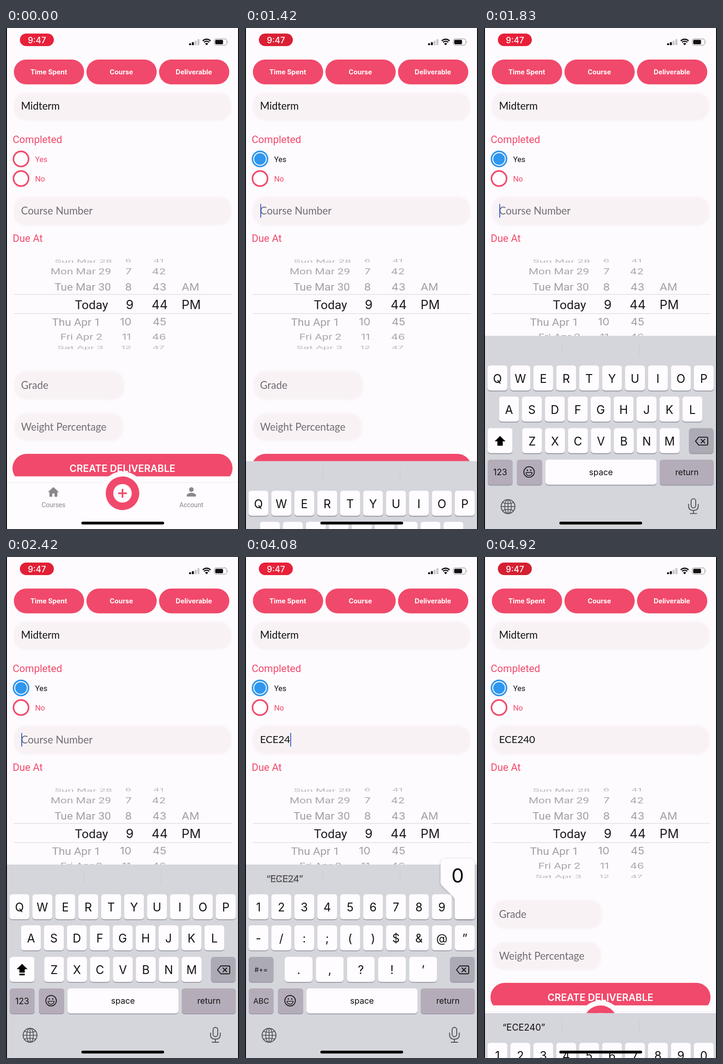
An HTML page for the animation above (5.01 s loop, 504 by 1080 pixels).

```html
<!DOCTYPE html>
<html lang="en">
<head>
<meta charset="utf-8">
<title>Deliverable form</title>
<style>
  html, body { margin: 0; width: 100%; height: 100%; overflow: hidden; background: #fefbfe; }
  svg { display: block; width: 504px; height: 1080px; }
  text { white-space: pre; }
</style>
</head>
<body>
<svg id="stage" viewBox="0 0 504 1080" xmlns="http://www.w3.org/2000/svg">
  <defs>
    <filter id="soft" x="-5%" y="-20%" width="110%" height="140%"><feGaussianBlur stdDeviation="2"/></filter>
    <filter id="lift" x="-30%" y="-30%" width="160%" height="160%">
      <feDropShadow dx="0" dy="1" stdDeviation="2" flood-opacity=".25"/>
    </filter>
  </defs>
</svg>
<script>
const LOOP = 5010, STEP = 1000 / 12;
const PINK = '#f1496b', GREY = '#8b878c', BLUE = '#2f97ee';
const UI = 'Inter, Roboto, sans-serif', TEXT = 'Roboto, Inter, sans-serif', FORM = 'Lato, sans-serif';
const stage = document.getElementById('stage');

function add(parent, tag, attrs = {}) {
  const node = document.createElementNS('http://www.w3.org/2000/svg', tag);
  for (const k in attrs) node.setAttribute(k, attrs[k]);
  return parent.appendChild(node);
}
const group = (parent, attrs) => add(parent, 'g', attrs);
const box = (p, x, y, w, h, r, fill, more) =>
  add(p, 'rect', { x, y, width: w, height: h, rx: r, fill, ...more });
const disc = (p, cx, cy, r, fill, more) => add(p, 'circle', { cx, cy, r, fill, ...more });
const line = (p, d, stroke, width, more) =>
  add(p, 'path', { d, fill: 'none', stroke, 'stroke-width': width, 'stroke-linecap': 'round', 'stroke-linejoin': 'round', ...more });
const shape = (p, d, fill, more) => add(p, 'path', { d, fill, ...more });
const show = (node, on) => node.setAttribute('visibility', on ? 'visible' : 'hidden');

// cy is the middle of the capital letters
function label(p, s, x, cy, size, font, fill, more) {
  const t = add(p, 'text', { x, y: cy + size * .36, 'font-size': size, 'font-family': font, fill, ...more });
  t.textContent = s;
  return t;
}
const centred = (p, s, x, cy, size, font, fill, more) =>
  label(p, s, x, cy, size, font, fill, { 'text-anchor': 'middle', ...more });

// Page
box(stage, 0, 0, 504, 1080, 0, '#fefbfe');
const page = group(stage);

const pill = box(page, 30, 12, 73.5, 27, 13.5, '#e8203a');
centred(page, '9:47', 67, 26, 18.2, UI, '#fff', { 'font-weight': 500 });

[[396, 4], [402, 6.5], [408, 9.5], [414, 13]].forEach(([x, h], i) =>
  box(page, x, 37 - h, 4.4, h, 1, i < 2 ? '#111' : '#c9c6c9'));
shape(page, 'M434 37.3 L430.6 33.7 Q434 30.8 437.4 33.7 Z', '#111');
line(page, 'M428.3 30.8 Q434 26.2 439.7 30.8', '#111', 2.6, { 'stroke-linecap': 'butt' });
line(page, 'M425.5 27.6 Q434 20.6 442.5 27.6', '#111', 2.8, { 'stroke-linecap': 'butt' });
box(page, 450.5, 23.5, 27, 13.5, 4, 'none', { stroke: '#a9a6a9', 'stroke-width': 1.3 });
box(page, 452.5, 25.5, 17, 9.5, 2.2, '#111');
shape(page, 'M479.3 28 q2.4 2.3 0 4.6 z', '#a9a6a9');

['Time Spent', 'Course', 'Deliverable'].forEach((s, i) => {
  const x = 17 + i * 157;
  box(page, x, 68, 152, 53.5, 26.7, PINK);
  centred(page, s, x + 75.5, 95, 14.3, UI, '#fff', { 'font-weight': 700 });
});

const field = (x, y, w, h) => box(page, x, y, w, h, 27, '#f8f2f5', { filter: 'url(#soft)' });
field(16, 139, 472, 61);
field(16, 363, 472, 63);
field(18, 739, 238, 63);
field(18, 830, 236, 61);
label(page, 'Midterm', 32.5, 168.5, 22.1, FORM, '#111');
label(page, 'Grade', 32.5, 770, 22.2, FORM, '#716c72');
label(page, 'Weight Percentage', 32.5, 860.5, 22.2, FORM, '#716c72');
const hint = label(page, 'Course Number', 32.5, 393.5, 22.3, FORM, '#716c72');
const entry = label(page, '', 32.5, 393.5, 22, FORM, '#111');
const caret = box(page, 33, 379, 2, 30, 1, '#3b66cf');

label(page, 'Completed', 14.5, 240, 22, TEXT, PINK);
label(page, 'Due At', 14.5, 453, 22, TEXT, PINK);
const ring = (parent, y, colour) =>
  disc(parent, 32.5, y, 16.3, '#fffdff', { stroke: colour, 'stroke-width': 3.4 });
const yesOff = group(page), yesOn = group(page);
ring(yesOff, 282.3, PINK);
label(yesOff, 'Yes', 63, 283, 16.4, TEXT, PINK);
ring(yesOn, 282.3, BLUE);
disc(yesOn, 32.5, 282.3, 12.6, BLUE);
label(yesOn, 'Yes', 63, 283, 16.4, TEXT, '#111');
ring(page, 324.5, PINK);
label(page, 'No', 63, 325, 16.6, TEXT, PINK);

// Date wheel: centre y, vertical squash, colour, then [text, centre x] per column
const ROWS = [
  [502, .4, '#bab7bb', ['Sun Mar 28', 167.5], ['6', 264.5], ['41', 329.5]],
  [525, .72, '#aaa7ab', ['Mon Mar 29', 162], ['7', 265], ['42', 330.5]],
  [558, .92, '#a29fa3', ['Tue Mar 30', 166], ['8', 265], ['43', 332], ['AM', 399]],
  [596, 1, '#1c1b1d', ['Today', 185], ['9', 267.5], ['44', 332.5], ['PM', 400.5]],
  [633.5, .92, '#a29fa3', ['Thu Apr 1', 152], ['10', 259], ['45', 332]],
  [666, .72, '#aaa7ab', ['Fri Apr 2', 163], ['11', 260.5], ['46', 331]],
  [688.5, .4, '#bab7bb', ['Sat Apr 3', 161], ['12', 260], ['47', 330]]
];
for (const [y, squash, fill, ...cells] of ROWS) {
  const big = squash === 1;
  cells.forEach(([s, x], col) => {
    const g = group(page, { transform: `translate(${x} ${y}) scale(1 ${squash})` });
    if (col) centred(g, s, 0, 0, big ? 27 : squash < .5 ? 22 : 24, UI, fill);
    else centred(g, s, 0, 0, big ? 26.7 : 24.4, TEXT, fill);
  });
}
box(page, 17, 573.8, 472, 1.2, 0, '#dbd8db');
box(page, 17, 615, 472, 1.2, 0, '#dbd8db');

box(page, 14, 918, 476, 62, 31, PINK);
centred(page, 'CREATE DELIVERABLE', 251.8, 949.5, 21.1, UI, '#fff', { 'font-weight': 600 });

// Tab bar
box(page, 0, 966.5, 504, 114, 0, '#fefcfe');
box(page, 2, 979, 500, 1.2, 0, '#efecef');
disc(page, 252, 1003, 47, '#fefcfe');
disc(page, 252, 1003, 36.3, PINK);
disc(page, 252, 1003, 20, '#fffdff');
line(page, 'M242.5 1003 h19 M252 993.5 v19', PINK, 3.6, { 'stroke-linecap': 'butt' });
shape(page, 'M102.5 989.5 L114.5 1000.5 H111 V1010.5 H105 V1003.5 H100 V1010.5 H94 V1000.5 H90.5 Z', GREY);
disc(page, 401, 995, 5, GREY);
shape(page, 'M391 1010 V1007.5 C391 1004 397 1002 401 1002 S411 1004 411 1007.5 V1010 Z', GREY);
centred(page, 'Courses', 102.8, 1028.3, 14, TEXT, GREY);
centred(page, 'Account', 401, 1028.3, 14, TEXT, GREY);

// Keyboard
const TOP = 663, TRAVEL = 1080 - TOP, PITCH = 49.6;
const DARK = '#b4adb9', SLATE = '#acabb5', INK = '#111';
const keyboard = group(stage);
box(keyboard, 0, TOP, 504, 460, 0, '#d5d5dc');
for (const x of [168, 335]) box(keyboard, x, 676, 1, 28, 0, '#c9c9d1');

function cap(parent, x, y, w, fill = '#fefcfe') {
  box(parent, x, y + 1.8, w, 54, 6, '#9a99a2');
  box(parent, x, y, w, 54, 6, fill);
}
function keyRow(parent, chars, first, y, pitch = PITCH, w = 43) {
  [...chars].forEach((c, i) => {
    const cx = first + i * pitch;
    cap(parent, cx - w / 2, y, w);
    centred(parent, c, cx, y + 28, 25, UI, INK);
  });
}
const letters = group(keyboard), numbers = group(keyboard);
keyRow(letters, 'QWERTYUIOP', 29, 727);
keyRow(letters, 'ASDFGHJKL', 54, 794);
keyRow(letters, 'ZXCVBNM', 104, 862);
cap(letters, 8, 862, 53.5);
cap(letters, 8, 930, 54, DARK);
centred(letters, '123', 35, 957, 18.4, UI, INK);
const shiftIcon = shape(letters, 'M34.8 879 L46.5 890.5 H40.5 V900 H29 V890.5 H23 Z', '#000');
const lockIcon = shape(letters, 'M34.8 877 L46.5 888.5 H40.5 V896 H29 V888.5 H23 Z M29 898.2 H40.5 V901.8 H29 Z', '#000');

keyRow(numbers, '1234567890', 29, 727);
keyRow(numbers, '-/:;()$&@”', 29, 794);
keyRow(numbers, '.,?!’', 116, 862, 67.3, 60);
cap(numbers, 8, 862, 53.5, SLATE);
centred(numbers, '#+=', 34.8, 890, 14.7, UI, INK);
cap(numbers, 8, 930, 54, DARK);
centred(numbers, 'ABC', 35, 957.5, 16.4, UI, INK);

cap(keyboard, 443.5, 862, 53, SLATE);
line(keyboard, 'M457.5 890 L464.5 881.5 H481.5 Q484 881.5 484 884 V896 Q484 898.5 481.5 898.5 H464.5 Z', INK, 1.9);
line(keyboard, 'M469.5 886 l8 8 M477.5 886 l-8 8', INK, 1.9);
cap(keyboard, 71, 930, 55, DARK);
disc(keyboard, 97.5, 956.5, 11.4, 'none', { stroke: INK, 'stroke-width': 1.7 });
for (const cx of [93.8, 101.2]) add(keyboard, 'ellipse', { cx, cy: 952.8, rx: 1.3, ry: 1.8, fill: INK });
line(keyboard, 'M90.8 957.6 H104.2 A6.7 6.7 0 0 1 90.8 957.6 Z', INK, 1.4);
cap(keyboard, 133, 930, 240);
centred(keyboard, 'space', 253, 956.5, 18, UI, INK);
cap(keyboard, 380, 930, 117, DARK);
centred(keyboard, 'return', 439, 956.5, 17.8, UI, INK);

const ICON = '#4f4f57';
disc(keyboard, 52, 1031, 15, 'none', { stroke: ICON, 'stroke-width': 1.9 });
add(keyboard, 'ellipse', { cx: 52, cy: 1031, rx: 7.2, ry: 15, fill: 'none', stroke: ICON, 'stroke-width': 1.6 });
line(keyboard, 'M37 1031 h30 M52 1016 v30 M40 1022.5 Q52 1027 64 1022.5 M40 1039.5 Q52 1035 64 1039.5', ICON, 1.6);
box(keyboard, 448, 1014, 10, 20, 5, 'none', { stroke: ICON, 'stroke-width': 1.9 });
line(keyboard, 'M442.5 1026 V1030 Q442.5 1039.5 453 1039.5 T463.5 1030 V1026 M453 1039.5 V1046 M446 1046 h14', ICON, 1.9);

const oldGuess = centred(keyboard, '', 86, 694, 19.7, UI, INK);
const newGuess = centred(keyboard, '', 86, 694, 19.7, UI, INK);

// Enlarged key shown while a finger is down
const bubble = group(keyboard, { filter: 'url(#lift)' });
const bubblePath = shape(bubble, '', '#fefcfe');
const bubbleText = centred(bubble, '', 0, 686.5, 43, UI, INK);
function press(char, cx, y) {
  const right = Math.min(497, Math.max(81, cx + 37)), left = right - 74;
  const kl = cx - 21.5, kr = cx + 21.5, top = y - 77;
  bubblePath.setAttribute('d', `M${left + 12} ${top} H${right - 12} q12 0 12 12 V${y - 24} L${kr} ${y + 10}
    V${y + 48} q0 6 -6 6 H${kl + 6} q-6 0 -6 -6 V${y + 14} q0 -5 -4 -9 L${left + 4} ${y - 18} q-4 -4 -4 -9 V${top + 12} q0 -12 12 -12 Z`);
  bubbleText.textContent = char;
  bubbleText.setAttribute('x', (left + right) / 2);
  bubbleText.setAttribute('y', y - 40.5 + 43 * .36);
}

// Screen edges and home bar stay above everything
box(stage, 163, 1064.3, 179, 6, 3, '#000');
box(stage, 0, 0, 2, 1080, 0, '#000');
box(stage, 502, 0, 2, 1080, 0, '#000');

// Timeline
const CHECK = 920, FOCUS = 1349, LOCK = 2080, DIGITS = 3410, BLUR = 4764;
const TYPED = [ // time of release, key, key centre x, key top
  [2583, 'E', 128.2, 727],
  [2833, 'C', 203.2, 862],
  [3000, 'E', 128.2, 727],
  [3666, '2', 78.6, 727],
  [3916, '4', 177.8, 727],
  [4166, '0', 475.4, 727]
];
const HOLD = 120, FADE = 220;
const quote = s => s ? `“${s}”` : '';

// Share of the way still to go, for a critically damped spring
function spring(ms) {
  if (ms <= 0) return 1;
  const k = ms * .0183;
  return (1 + k) * Math.exp(-k);
}

function draw(t) {
  const glow = .5 + .5 * Math.cos(t / 1000 * Math.PI);
  pill.setAttribute('fill', `rgb(${Math.round(212 + 20 * glow)},32,${Math.round(50 + 7 * glow)})`);
  show(yesOn, t >= CHECK);
  show(yesOff, t < CHECK);

  const done = TYPED.filter(k => t >= k[0]);
  const word = done.map(k => k[1]).join('');
  const last = done.length ? done[done.length - 1][0] : FOCUS;
  entry.textContent = word;
  show(hint, !word);
  show(caret, t >= FOCUS && t < BLUR && (t - last) % 1000 < 600);
  caret.setAttribute('x', word ? 32.5 + entry.getComputedTextLength() : 33);

  const mix = Math.max(0, Math.min(1, (t - last) / FADE));
  newGuess.textContent = quote(word);
  oldGuess.textContent = quote(word.slice(0, -1));
  newGuess.setAttribute('opacity', mix);
  oldGuess.setAttribute('opacity', 1 - mix);

  show(letters, t < DIGITS);
  show(numbers, t >= DIGITS);
  show(shiftIcon, t < LOCK);
  show(lockIcon, t >= LOCK && t < DIGITS);
  const down = TYPED.find(k => t < k[0] && t >= k[0] - HOLD);
  show(bubble, !!down);
  if (down) press(...down.slice(1));

  const away = t < BLUR ? spring(t - FOCUS) : 1 - spring(t - BLUR);
  keyboard.setAttribute('transform', `translate(0 ${(TRAVEL * away).toFixed(1)})`);
  show(keyboard, t >= FOCUS);
}

// The shift, lock and key layers inherit the keyboard's visibility only while it is off screen,
// so the picture advances on a fixed beat of twelve steps a second
const start = performance.now();
function tick() {
  const t = (performance.now() - start) % LOOP;
  draw(Math.min(59, Math.floor(t / STEP + .045)) * STEP);
  requestAnimationFrame(tick);
}
tick();
</script>
</body>
</html>
```
